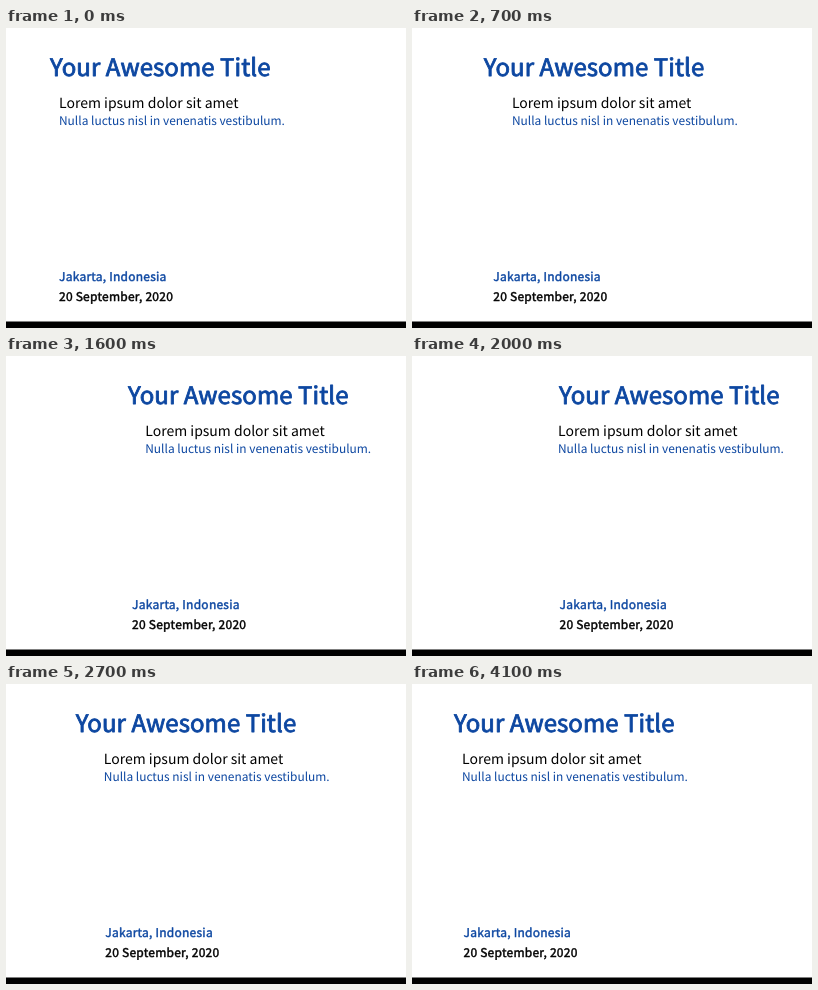
Write an HTML page that moves like this. It is 400 px wide and 300 px high and loops after 4.8 s.

```html
<!DOCTYPE html>
<html lang="en">
<head>
<meta charset="utf-8">
<title>Sliding title page</title>
<style>
  html, body { margin: 0; width: 100%; height: 100%; overflow: hidden; background: #fff; }
  svg { display: block; width: 100vw; height: 100vh; }
  text { font-family: "Noto Sans CJK SC", "Noto Sans CJK JP", "Noto Sans CJK", sans-serif; text-rendering: geometricPrecision; }
  .blue { fill: #0d47a1; stroke: #0d47a1; }
  .black { fill: #000; stroke: #000; }
  text { stroke-width: 0; }
  /* a thin outline gives the weight between regular and bold */
  .strong { stroke-width: .036em; stroke-linejoin: round; }
  #title { letter-spacing: .005em; }
  #place { letter-spacing: .015em; }
</style>
</head>
<body>
<svg viewBox="0 0 400 300">
  <rect y="293.5" width="400" height="6.5"/>
  <g id="title">
    <text class="blue strong" y="48.2" font-size="24">Your Awesome Title</text>
  </g>
  <g id="intro">
    <text class="black" y="80" font-size="14">Lorem ipsum dolor sit amet</text>
    <text class="blue" y="97.4" font-size="11.93">Nulla luctus nisl in venenatis vestibulum.</text>
  </g>
  <g id="place">
    <text class="blue strong" y="253" font-size="12">Jakarta, Indonesia</text>
    <text class="black strong" y="273" font-size="12">20 September, 2020</text>
  </g>
</svg>
<script>
const LOOP = 4800, STEP = 100, TURN = 2000;

const linear = u => u;
const easeIn = p => u => u ** p;
const easeOut = p => u => 1 - (1 - u) ** p;

// Each group starts at x and runs through its legs to the right and back.
const slides = {
  title: { x: 44, legs: [
    { end: TURN, to: 147, ease: easeIn(1.25) },
    { end: 2950, to: 42, ease: linear }
  ] },
  intro: { x: 53, legs: [
    { end: TURN, to: 146, ease: easeOut(1.63) },
    { end: 2980, to: 78.5, ease: linear },
    { end: 4050, to: 50, ease: linear }
  ] },
  place: { x: 53, legs: [
    { end: TURN, to: 147.5, ease: easeIn(1.15) },
    { end: 2980, to: 80, ease: linear },
    { end: 4050, to: 51.5, ease: linear }
  ] }
};

function xAt({ x, legs }, t) {
  let begin = 0;
  for (const { end, to, ease } of legs) {
    if (t < end) return x + (to - x) * ease((t - begin) / (end - begin));
    begin = end;
    x = to;
  }
  return x;
}

const start = performance.now();

function draw() {
  const t = Math.floor((performance.now() - start) % LOOP / STEP) * STEP;
  for (const id in slides) {
    document.getElementById(id).setAttribute("transform", `translate(${xAt(slides[id], t)} 0)`);
  }
  requestAnimationFrame(draw);
}
draw();
</script>
</body>
</html>
```
